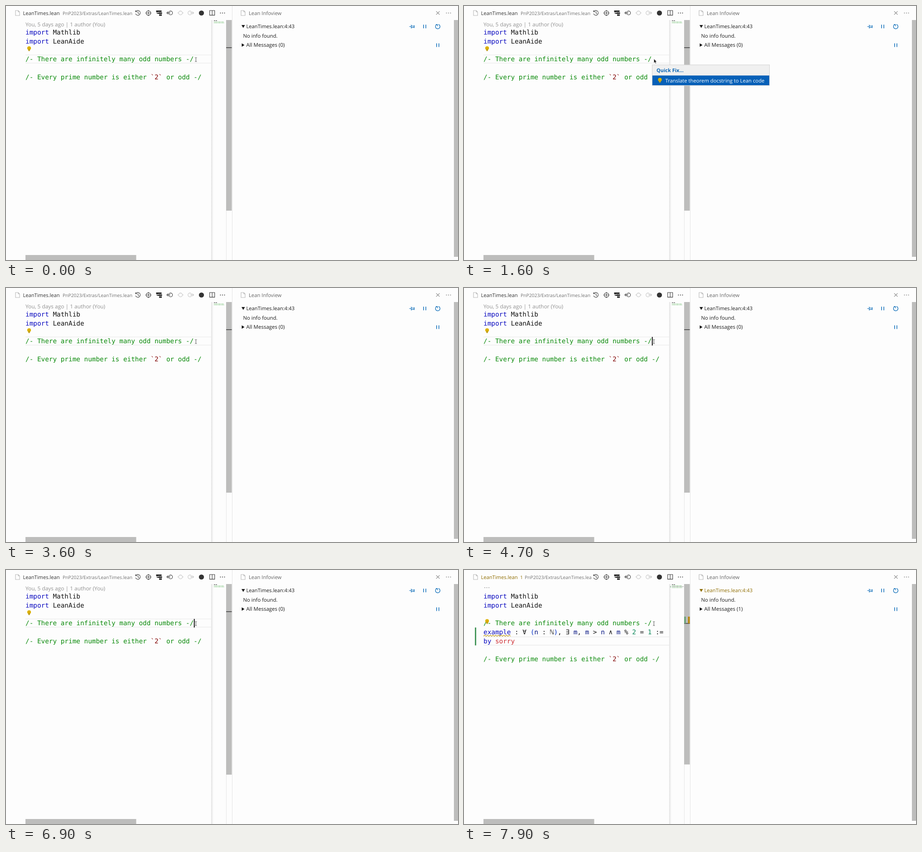
Recreate the animation shown at these times as an HTML page. Size 998 by 561 pixels, loop 8 s.

```html
<!DOCTYPE html>
<html lang="en">
<head>
<meta charset="utf-8">
<title>Lean editor</title>
<style>
html, body { margin: 0; width: 998px; height: 561px; overflow: hidden; background: #fdfdfd; }
svg { display: block; }
text { white-space: pre; text-rendering: geometricPrecision; }
.ui { font-family: "Open Sans", "Noto Sans", sans-serif; font-size: 11.3px; fill: #1c1c1c; }
.code { font-family: "DejaVu Sans Mono", monospace; font-size: 14.35px; fill: #111; }
.kw { fill: #0a0ac0; }
.doc { fill: #0b8a0b; }
.lit { fill: #800000; }
.num { fill: #098658; }
.par { fill: #0431c8; }
.err { fill: #cd2b31; }
.dim { fill: #919191; }
.line { fill: none; stroke: #3a3a3a; stroke-width: 1.1; }
.pale { stroke: #c4c4c4; }
.blue { stroke: #0b6cb8; }
.bar { fill: #bdbdbc; }
</style>
</head>
<body>
<svg width="998" height="561" viewBox="0 0 998 561">
  <defs>
    <linearGradient id="shade">
      <stop offset="0" stop-color="#e2e2e2"/>
      <stop offset="1" stop-color="#fdfdfd"/>
    </linearGradient>
    <g id="file"><path class="line" style="stroke:#b9b9b9" d="M.5.5h6l3 3v8h-9zM6.5.5v3h3"/></g>
    <g id="bulb">
      <circle r="4.1" fill="#dcb000"/>
      <path d="M-2 2.5h4v3.2q-2 1.6-4 0z" fill="#b48f00"/>
      <path d="M-1.5 4.6h3" stroke="#fff3b0" stroke-width=".6"/>
    </g>
    <g id="pause"><path class="blue" d="M-2.5-4v8M2.5-4v8" stroke-width="1.5"/></g>
    <g id="dots"><circle cx="-4.5" r="1"/><circle r="1"/><circle cx="4.5" r="1"/></g>
  </defs>
  <rect width="998" height="561" fill="#fdfdfd"/>

  <!-- tab bar -->
  <use href="#file" x="20.5" y="9.5"/>
  <text class="ui" id="tab" x="37.5" y="19.7" font-size="11" style="font-size:11.15px">LeanTimes.lean</text>
  <text class="ui dim" id="path" x="125" y="19.7" style="font-size:10.3px;fill:#717171">PnP2023/Extras/LeanTimes.lean</text>
  <g id="warnTab">
    <text class="ui" x="124" y="19.7" style="font-size:10.3px;fill:#8f6d00">1</text>
    <svg x="134" y="0" width="148" height="30">
      <text class="ui" x="0" y="19.7" style="font-size:10.3px;fill:#717171">PnP2023/Extras/LeanTimes.lean</text>
    </svg>
  </g>
  <g class="line">
    <path d="M286.8 12.2a5.3 5.3 0 1 1-.6 4.8M286.2 9.6v3.2h3.2M291.5 12v3.8l2.6 1.6"/>
    <circle cx="314.5" cy="15.5" r="5"/><circle cx="314.5" cy="15.5" r="1.6"/>
    <path d="M314.5 9v3M314.5 19v3M308 15.5h3M318 15.5h3"/>
    <circle cx="363.5" cy="15.3" r="4.2"/>
    <path d="M363 15.3h-8M358 12.4l-3 2.9 3 2.9"/>
    <g class="pale">
      <circle cx="385.3" cy="15.3" r="4.2"/><path d="M378.5 15.3h2.6M389.5 15.3h2.6"/>
      <circle cx="406" cy="15.3" r="4.2"/><path d="M406.5 15.3h8M411.5 12.4l3 2.9-3 2.9"/>
    </g>
    <path d="M449.7 10h11v10.4h-11zM455.2 10v10.4"/>
    <path d="M949.8 11.6l7.6 7.6M957.4 11.6l-7.6 7.6" style="stroke:#858585"/>
  </g>
  <path d="M331.5 10h12v3h-12zM336 14.2h8.5v3H336zM338 18.4h6v3h-6zM333 13h1.2v2.7h2V17H333z" fill="#151515"/>
  <circle cx="431.5" cy="15.5" r="5.6" fill="#333"/>
  <use href="#dots" x="478" y="15.5" fill="#333"/>
  <use href="#dots" x="977" y="15.5" fill="#858585"/>

  <!-- editor -->
  <text class="ui dim" id="lens" x="43" y="44.7" style="font-size:11.9px">You, 5 days ago | 1 author (You)</text>
  <g id="lensDots" fill="#919191"><circle cx="46" cy="39" r=".9"/><circle cx="50.5" cy="39" r=".9"/><circle cx="55" cy="39" r=".9"/></g>
  <path class="rowLine" id="rowA" d="M43 108.2h411M43 126.2h411" stroke="#ebebeb" stroke-width="1.3"/>
  <path id="rowB" d="M43 147.6h411M43 166h411" stroke="#ebebeb" stroke-width="1.3"/>
  <g class="code">
    <text x="43" y="63"><tspan class="kw">import</tspan> Mathlib</text>
    <text x="43" y="82.7"><tspan class="kw">import</tspan> LeanAide</text>
    <text class="doc" x="43" y="122.2">/- There are infinitely many odd numbers -/</text>
    <g id="prime">
      <text class="doc" x="43" y="161.8">/- Every prime number is either <tspan class="lit">`2`</tspan> or odd -/</text>
    </g>
    <g id="thm">
      <text x="43" y="142"><tspan class="kw">example</tspan> : ∀ <tspan class="par">(</tspan><tspan class="var">n</tspan> : ℕ<tspan class="par">)</tspan>, ∃ <tspan class="var">m</tspan>, <tspan class="var">m</tspan> &gt; <tspan class="var">n</tspan> ∧ <tspan class="var">m</tspan> % <tspan class="num">2</tspan> = <tspan class="num">1</tspan> :=</text>
      <text x="43" y="161.8"><tspan class="kw">by</tspan> <tspan class="err">sorry</tspan></text>
      <rect x="24" y="127" width="3" height="39.5" fill="#48985d"/>
    </g>
    <path id="squiggle" fill="none" stroke="#bf9a1c" stroke-width="1.1"/>
  </g>
  <use id="bulbA" href="#bulb" x="51" y="93"/>
  <use id="bulbB" href="#bulb" x="51" y="112.5"/>
  <rect id="caretA" x="414.8" y="108" width="1.8" height="19" fill="#000"/>
  <rect id="caretB" x="112.3" y="147.3" width="1.8" height="19" fill="#000"/>

  <!-- minimap and scrollbars -->
  <rect x="453" y="31" width="5" height="530" fill="url(#shade)"/>
  <path d="M459 32.3h7" stroke="#555" stroke-width="1.3" stroke-dasharray="3 1"/>
  <g fill="none" stroke-width="1" stroke-dasharray="2 .7 4 .7">
    <path id="mapA" d="M459 35h22M459 37.3h23" stroke="#86c786"/>
    <g id="mapB">
      <path d="M459 34.7h22M459 39h23" stroke="#86c786"/>
      <path d="M459 36.7h26" stroke="#7a8a7a"/>
      <path d="M456 35.5v3" stroke="#48985d" stroke-dasharray="none"/>
    </g>
  </g>
  <path d="M486.5 31v530" stroke="#e6e6e6"/>
  <rect class="bar" id="thumbA" x="486" y="31" width="12.5" height="421"/>
  <rect class="bar" id="thumbB" x="486" y="31" width="12.5" height="398.5"/>
  <path id="markA" d="M486 92h12.5" stroke="#4a4a4a" stroke-width="1.7"/>
  <g id="markB">
    <path d="M486 118h12.5" stroke="#4a4a4a" stroke-width="1.7"/>
    <rect x="486" y="103" width="4" height="15" fill="#6fa37d"/>
  </g>
  <rect id="markWarn" x="494.5" y="103" width="4" height="15" fill="#b8860b"/>
  <path d="M499.5 0v561" stroke="#e4e4e4"/>
  <rect class="bar" x="43" y="550" width="244.5" height="11"/>
  <rect class="bar" x="989" y="31" width="9" height="523"/>

  <!-- info view -->
  <use href="#file" x="518.5" y="9.5"/>
  <text class="ui" x="536" y="19.7" style="fill:#666">Lean Infoview</text>
  <g id="goal" fill="#1c1c1c">
    <path d="M520 42h7.6l-3.8 6.6z"/>
    <text class="ui" x="530.5" y="49.2" style="font-size:11.2px;fill:inherit">LeanTimes.lean:4:43</text>
  </g>
  <text class="ui" x="523.5" y="69.6">No info found.</text>
  <path d="M520.5 82.6v7.4l6-3.7z" fill="#111"/>
  <text class="ui" id="msg0" x="530.5" y="90.4" style="font-size:11.5px">All Messages (0)</text>
  <text class="ui" id="msg1" x="530.5" y="90.4" style="font-size:11.5px">All Messages (1)</text>
  <g class="line blue">
    <path d="M890.5 45.5h4M894.8 41.6v7.8M894.8 43.4l2.4.8h4v3l-4 .2-2.4.6M901.4 42.4v6.2"/>
    <path d="M950.2 41.4a5 5 0 1 0 4.6-.8M949 41h3.6v3.4" style="stroke-width:1.3"/>
  </g>
  <use href="#pause" x="924.5" y="45.3"/>
  <use href="#pause" x="953.3" y="86.4"/>

  <!-- quick fix menu and pointer -->
  <g id="menu">
    <rect x="415.5" y="130" width="259" height="45.5" fill="#f0f0f0" stroke="#d2d2d2"/>
    <rect x="416" y="153.5" width="258" height="21.5" fill="#0660b8"/>
    <text class="ui" x="425" y="146" font-weight="700" style="font-size:11px;fill:#0a64b4">Quick Fix...</text>
    <use href="#bulb" x="432.5" y="162.8"/>
    <text class="ui" x="444.5" y="168.6" style="fill:#fff">Translate theorem docstring to Lean code</text>
    <path d="M419.3 116.8v9l2.1-1.9 1.5 3.3 1.5-.7-1.5-3.2h2.7z" fill="#111" stroke="#fff" stroke-width=".6"/>
  </g>
  <path id="beam" d="M417.3 113.7q1.8 0 2 1.2.2-1.2 2-1.2M419.3 114.5v8M417.3 123q1.8 0 2-1.2.2 1.2 2 1.2" fill="none" stroke="#555" stroke-width="1"/>
</svg>
<script>
const LOOP = 8000;
const OPEN = 1400, CLOSE = 2600, INSERT = 7000, CHECK = 7200, WARN = 7400;

// Hard steps: each entry is [time, value].
function step(selector, prop, table) {
  const frames = table.map(([t, value]) => ({ offset: t / LOOP, [prop]: value, easing: 'step-end' }));
  frames.push({ offset: 1, [prop]: table[table.length - 1][1] });
  document.querySelectorAll(selector).forEach(el =>
    el.animate(frames, { duration: LOOP, iterations: Infinity }));
}

// Starts at the given state and flips it at every listed time.
function toggle(selector, on, ...times) {
  step(selector, 'opacity', [0, ...times].map((t, i) => [t, (i % 2 === 0) === on ? 1 : 0]));
}

let wave = 'M43 146';
for (let i = 1; i <= 20; i++) wave += `L${43 + i * 3} ${i % 2 ? 143.8 : 146.4}`;
document.getElementById('squiggle').setAttribute('d', wave);

toggle('#menu', false, OPEN, CLOSE);
toggle('#beam', true, OPEN, CLOSE);
toggle('#caretA', false, 300, 800, 1300, OPEN, CLOSE, 3200, 3700, 4200, 4700, 5200, 5700, 6200, 6700, INSERT);
toggle('#caretB', false, INSERT, INSERT + 500);

toggle('#rowA, #bulbA, #mapA, #thumbA, #markA', true, INSERT);
toggle('#rowB, #bulbB, #mapB, #thumbB, #markB, #thm', false, INSERT);
step('#prime', 'transform', [[0, 'translateY(0px)'], [INSERT, 'translateY(39.5px)']]);

toggle('#squiggle, #markWarn, #msg1', false, CHECK);
toggle('#msg0', true, CHECK);
step('#goal', 'fill', [[0, '#1c1c1c'], [CHECK, '#8f6d00']]);

step('#tab', 'fill', [[0, '#333333'], [WARN, '#8f6d00']]);
step('.var', 'fill', [[0, '#111111'], [WARN, '#001080']]);
toggle('#path, #lens', true, WARN);
toggle('#warnTab, #lensDots', false, WARN);
</script>
</body>
</html>
```
